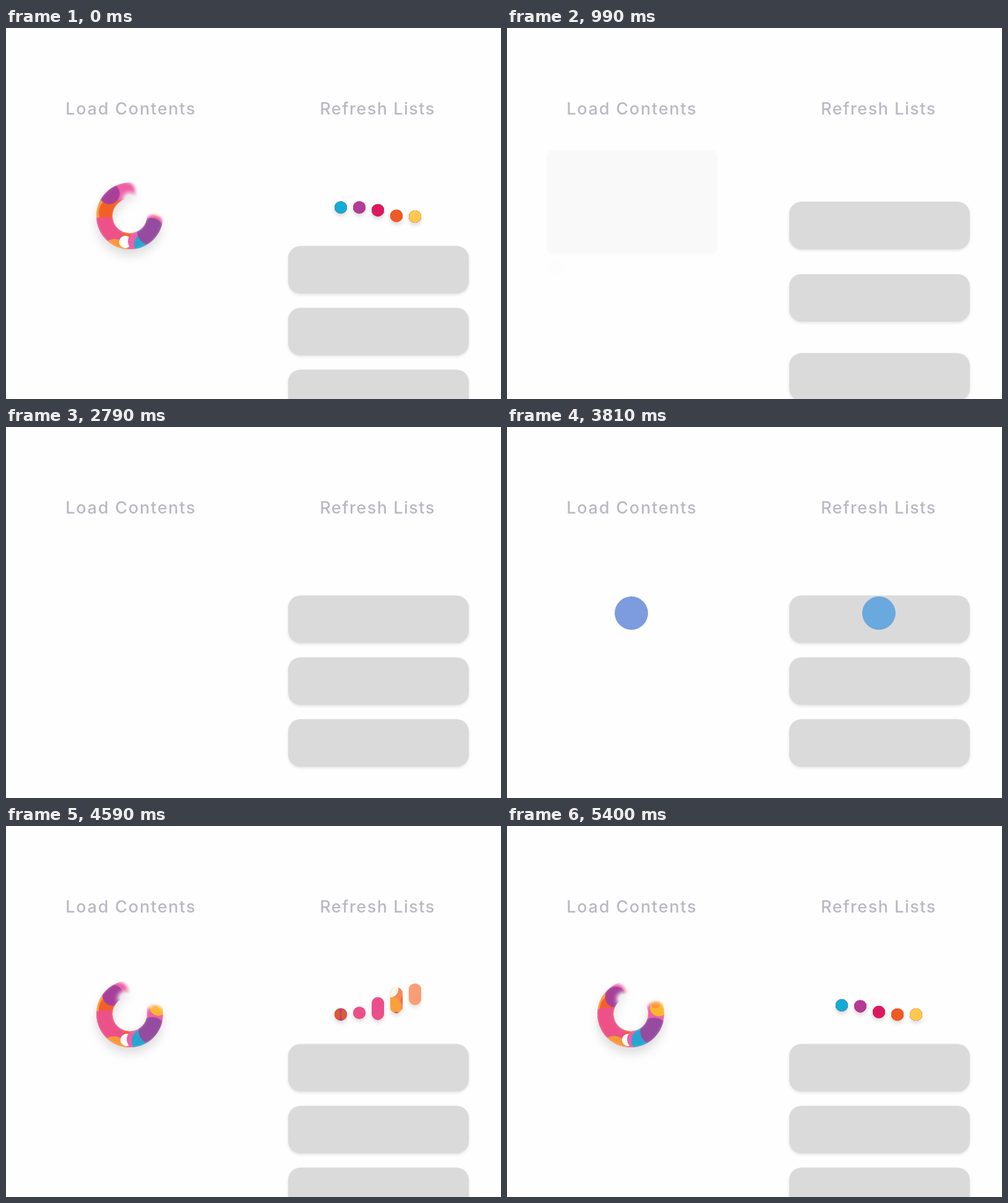
An HTML page that plays this animation: 800 px wide and 600 px high, repeating every 5430 ms.

```html
<!DOCTYPE html>
<html lang="en">
<head>
<meta charset="utf-8">
<title>Loading and refreshing</title>
<style>
  html, body { margin: 0; width: 100%; height: 100%; overflow: hidden; background: #fefefe; }
  svg { display: block; width: 800px; height: 600px; }
  text { font: 500 27px Inter, "Open Sans", sans-serif; fill: #b9b9c3; text-anchor: middle; }
  .block { fill: #dadada; filter: drop-shadow(0 2px 2px rgba(0, 0, 0, .1)); }
  .dot { filter: drop-shadow(0 4px 3px rgba(0, 0, 0, .14)); }
  #ring { filter: drop-shadow(0 10px 8px rgba(0, 0, 0, .13)); }
</style>
</head>
<body>
<svg id="stage" viewBox="0 0 800 600" xmlns="http://www.w3.org/2000/svg">
  <defs id="defs">
    <filter id="soft" filterUnits="userSpaceOnUse" x="110" y="210" width="180" height="190">
      <feGaussianBlur stdDeviation="2.5"/>
    </filter>
    <clipPath id="annulus">
      <path clip-rule="evenodd" d="M146 304a54 54 0 1 0 108 0a54 54 0 1 0 -108 0zM172 304a28 28 0 1 0 56 0a28 28 0 1 0 -56 0z"/>
    </clipPath>
    <mask id="sweep" maskUnits="userSpaceOnUse" x="110" y="210" width="180" height="190">
      <g filter="url(#soft)">
        <path id="arc" fill="none" stroke="#fff" stroke-width="30" stroke-linecap="round"/>
        <circle id="notch" fill="#000"/>
      </g>
    </mask>
  </defs>
  <text x="201.8" y="140" letter-spacing="1.8">Load Contents</text>
  <text x="600.5" y="140" letter-spacing="1.5">Refresh Lists</text>
  <g id="card"></g>
  <g id="ring">
    <g mask="url(#sweep)"><g id="paint" clip-path="url(#annulus)"></g></g>
  </g>
  <g id="rows"></g>
  <g id="dots"></g>
  <circle id="tap" cx="201" cy="301" fill="#4472d2"/>
  <circle id="drag" cx="601" fill="#3a95e0"/>
</svg>
<script>
const LOOP = 5430, SPIN = 820, CX = 200, CY = 304;
const $ = id => document.getElementById(id);
const clamp = v => Math.min(1, Math.max(0, v));
const ramp = (t, from, to) => clamp((t - from) / (to - from));
const cubic = u => u < .5 ? 4 * u ** 3 : 1 - 4 * (1 - u) ** 3;
const ease = (t, start, length) => cubic(clamp((t - start) / length));

function set(el, attrs) {
  for (const k in attrs) el.setAttribute(k, attrs[k]);
  return el;
}
function add(parent, tag, attrs = {}) {
  const el = document.createElementNS("http://www.w3.org/2000/svg", tag);
  parent.appendChild(el);
  return set(el, attrs);
}
function block(parent, x, y, width, height, rx) {
  return add(parent, "rect", { x, y, width, height, rx, class: "block" });
}

// Placeholder card and list rows
const card = [
  block($("card"), 64.5, 197, 275, 168, 10),
  block($("card"), 67.5, 374.5, 25.5, 25, 9),
  block($("card"), 102.5, 374.5, 128, 25, 10),
  block($("card"), 278, 374.5, 60.5, 25, 10)
];
const rows = [0, 1, 2].map(i => block($("rows"), 456, 272.5 + 100 * i, 292, 77, 20));

// Ring colours: x, y, radius, drift x, drift y
const PINK = "#ee5fa6", ORANGE = "#f9983a", RED = "#f45f25", PURPLE = "#944ba0", BLUE = "#25a6d0", WHITE = "#fff";
const drifting = [
  [ORANGE, 150, 300, 30, 0, 0],
  [RED, 172, 298, 22, 0, .1],
  [RED, 196, 322, 17, .1, 0],
  ["#ec5188", 158, 336, 31, -.13, .42],
  [ORANGE, 176, 363, 22, .1, .05],
  [WHITE, 193, 346, 10, -.1, 0],
  [PINK, 213, 345, 16, .1, 0],
  [BLUE, 228, 350, 21, .2, .1],
  ["#fbb52f", 248, 291, 14, .1, -.1],
  [ORANGE, 243, 284, 8, .1, -.1],
  [PURPLE, 234, 329, 22, -.12, -.1],
  ["#a8409a", 167, 268, 17, -.3, -.3]
];
const swelling = [
  ["#f98b2a", 177, 346, 32],
  ["#ef5a9d", 229, 255, 45],
  [RED, 245, 298, 14],
  [WHITE, 244, 316, 14],
  [WHITE, 211, 337, 11],
  [PURPLE, 216, 318, 12],
  ["#fbc03a", 219, 349, 8],
  ["#b04a9c", 241, 333, 9],
  [BLUE, 234, 350, 16]
];
add($("paint"), "rect", { x: 140, y: 240, width: 120, height: 130, fill: PINK });
const paintCircle = ([fill, cx, cy, r]) => add($("paint"), "circle", { fill, cx, cy, r });
const driftEls = drifting.map(paintCircle);
const swellEls = swelling.map(paintCircle);

// Dot colour washes: x, y, radius, start, end
const washes = [
  ["#ef7fb0", 14, 0, 15, -120, -100],
  ["#f6834f", -14, -8, 32, 0, 120],
  ["#f99a32", -8, 10, 16, 150, 185],
  ["#f8631f", 18, 0, 13, 150, 190],
  ["#fff5ea", -10, -18, 15, 140, 190],
  ["#a8409a", 0, 24, 8, 170, 192],
  ["#ea4f8c", 0, 0, 32, 192, 240],
  ["#a8409a", 0, 0, 15, 300, 320],
  ["#df5a2e", -22, 0, 21.3, 296, 345],
  ["#df5a2e", 22, 0, 21.3, 296, 345]
];
const dots = ["#12add6", "#b33b98", "#da1a60", "#ef5a24", "#ffc94d"].map((color, i) => {
  const shape = add(add($("defs"), "clipPath", { id: "dot" + i }), "rect", { x: -10, width: 20, rx: 10 });
  const group = add($("dots"), "g", { class: "dot" });
  const inner = add(group, "g", { "clip-path": `url(#dot${i})` });
  add(inner, "rect", { x: -10, y: -22, width: 20, height: 44, fill: "#fdd27a" });
  const layers = [...washes, [color, 0, 0, 32, 360, 460]].map(([fill, cx, cy, r, from, to]) =>
    ({ el: add(inner, "circle", { fill, cx, cy }), r, from, to }));
  return { shape, group, layers };
});

function polar(deg, r) {
  const a = deg * Math.PI / 180;
  return [CX + r * Math.cos(a), CY + r * Math.sin(a)];
}

function drawRing(T) {
  const t = T - LOOP, turn = 2 * Math.PI / SPIN;
  const leave = ease(T, 6010, 220);
  const span = 10 + 232 * ease(T, 4190, 370) - 30 * leave;
  const tail = 18 + 360 * t / SPIN + 57.3 * (Math.sin(turn * (t + 60)) - Math.sin(turn * 60));
  const head = tail + span;
  const [x0, y0] = polar(tail, 41), [x1, y1] = polar(head, 41);
  $("arc").setAttribute("d", `M${x0} ${y0}A41 41 0 ${span > 180 ? 1 : 0} 1 ${x1} ${y1}`);
  const [cx, cy] = polar(T > 5980 ? tail - 8 : head + 8, 27);
  set($("notch"), { cx, cy, r: 13 * ramp(T, 4200, 4500) });

  const sway = Math.sin(turn * t) / turn;
  drifting.forEach(([, x, y, , vx, vy], i) => set(driftEls[i], { cx: x + vx * sway, cy: y + vy * sway }));
  const phase = ((t % SPIN) + SPIN) % SPIN - SPIN;
  const swell = Math.max(0, 1 - ((phase + 130) / 85) ** 2);
  swelling.forEach(([, , , r], i) => swellEls[i].setAttribute("r", r * swell));

  set($("ring"), {
    opacity: ramp(T, 4140, 4260) * (1 - leave ** 1.5),
    transform: `translate(${CX} ${CY}) scale(${1 - .3 * leave}) translate(${-CX} ${-CY})`
  });
}

function drawDot({ shape, group, layers }, i, T) {
  const age = T - 4242 - 55 * i;
  const down = clamp(age / 400), up = clamp((T - 5772 - 55 * i) / 400);
  const beat = T - LOOP - 55 * i;
  const hop = ease(beat, -215, 185) - ease(beat, -25, 200);
  const y = 267 + 38 * (cubic(down) - cubic(up)) - 15 * hop;
  const stretch = u => Math.max(0, 1 - ((u - .47) / .26) ** 2);
  const h = 20 + 22 * (stretch(down) + stretch(up));
  set(shape, { y: -h / 2, height: h });
  set(group, {
    transform: `translate(${541 + 30 * i} ${y})`,
    opacity: ramp(age, -120, 200) * (1 - ramp(up, .55, 1))
  });
  for (const { el, r, from, to } of layers) el.setAttribute("r", r * ramp(age, from, to));
}

function drawPointers(T) {
  const appear = ease(T, 3620, 260), burst = ramp(T, 4010, 4230);
  set($("tap"), { r: 14 + 14 * appear + 41 * burst, opacity: .75 * appear * (1 - burst) });
  set($("drag"), {
    r: 14 + 14 * appear,
    cy: 301 + 200 * ease(T, 4000, 400),
    opacity: .75 * appear * (1 - ramp(T, 4320, 4470))
  });
}

function draw(t) {
  // One pass of loading spans the loop seam
  const T = t < 2000 ? t + LOOP : t;
  card.forEach((el, i) => {
    const shown = t < 2460 ? ramp(t, 950 + 40 * i, 1300 + 40 * i) : t < 2790 ? .5 : 0;
    el.setAttribute("opacity", shown);
  });
  rows.forEach((el, i) => {
    const shift = 80 * (ease(T, 4120 - 40 * i, 300) - ease(T, 6210 + 40 * i, 300));
    el.setAttribute("y", 272.5 + 100 * i + shift);
  });
  drawRing(T);
  dots.forEach((dot, i) => drawDot(dot, i, T));
  drawPointers(T);
}

const begin = performance.now();
function tick() {
  draw((performance.now() - begin) % LOOP);
  requestAnimationFrame(tick);
}
tick();
</script>
</body>
</html>
```
